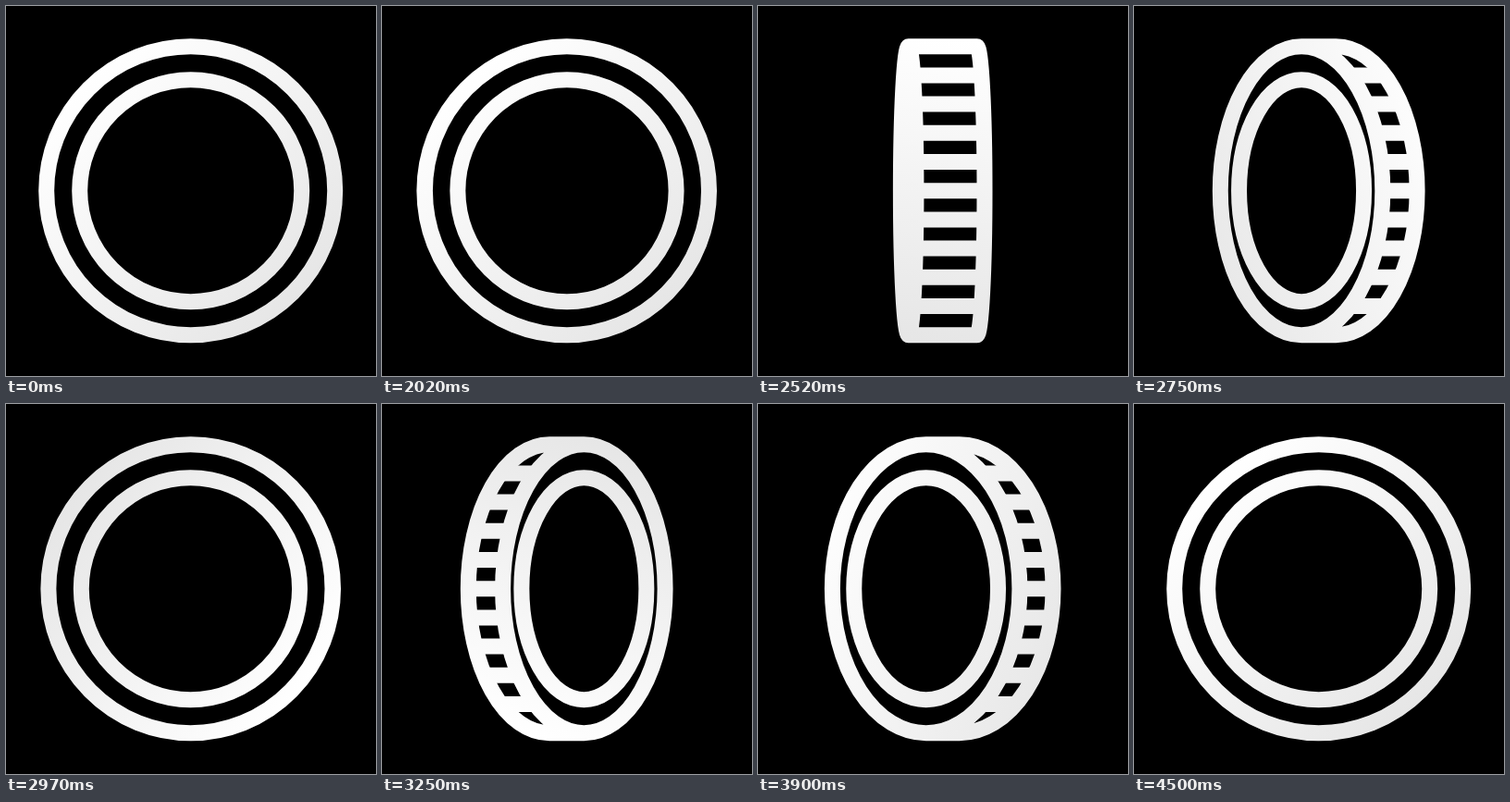
Write an HTML page that moves like this. It is 400 px wide and 400 px high and loops after 4520 ms.

```html
<!DOCTYPE html>
<html lang="en">
<head>
<meta charset="utf-8">
<title>Spinning coin</title>
<style>
  html, body { margin: 0; width: 100%; height: 100%; overflow: hidden; background: #000; }
  svg { display: block; width: 100%; height: 100%; }
</style>
</head>
<body>
<svg viewBox="0 0 400 400">
  <defs>
    <linearGradient id="shade" gradientUnits="userSpaceOnUse">
      <stop offset="0" stop-color="#fff"/>
      <stop offset="1" stop-color="#e6e6e6"/>
    </linearGradient>
  </defs>
  <path id="coin" fill="none" stroke="url(#shade)" stroke-width="17" stroke-linejoin="round"/>
  <path id="rim" fill="none" stroke="url(#shade)" stroke-width="17" stroke-linecap="butt"/>
</svg>
<script>
const LOOP = 4520, START = 1995, STEP = 25, STEPS = 100;
const MID = 199.7, R = 156, INNER = 120, DEPTH = 37.3, BARS = 10;
const coin = document.getElementById('coin');
const rim = document.getElementById('rim');
const shade = document.getElementById('shade');

// Slow start, linear finish: cubic-bezier(.167, 0, .833, .833)
function easeIn(u) {
  let lo = 0, hi = 1, s = 0;
  for (let i = 0; i < 24; i++) {
    s = (lo + hi) / 2;
    const x = 0.5 * s * (1 - s) ** 2 + 2.5 * s * s * (1 - s) + s ** 3;
    if (x < u) lo = s; else hi = s;
  }
  return 2.5 * s * s * (1 - s) + s ** 3;
}

const smooth = u => u * u * (3 - 2 * u);

// turn: 0 = facing us, 1 = edge on; side: where the rim shows
function pose(n) {
  if (n <= 0 || n >= STEPS) return { turn: 0, depth: 0, side: 1 };
  if (n >= 60) {
    const left = 1 - (n - 60) / 40;
    return { turn: left ** 2.05, depth: left ** 1.42, side: 1 };
  }
  const u = n % 20 / 20, opening = n >= 20 && n < 40;
  const k = opening ? 1 - u : u;
  return { turn: easeIn(k), depth: smooth(k), side: opening ? 1 : -1 };
}

// step, angle in degrees
const LIGHT = [[0, 45], [20, 90], [40, 225], [60, 365], [100, 405]];
const SPAN = 165;

function light(n) {
  let i = 0;
  while (i < LIGHT.length - 2 && n > LIGHT[i + 1][0]) i++;
  const a = LIGHT[i], b = LIGHT[i + 1], k = (n - a[0]) / (b[0] - a[0]);
  const angle = (a[1] + (b[1] - a[1]) * k) * Math.PI / 180;
  const dx = Math.cos(angle) * SPAN, dy = Math.sin(angle) * SPAN;
  const ends = { x1: MID - dx, y1: MID - dy, x2: MID + dx, y2: MID + dy };
  for (const key in ends) shade.setAttribute(key, ends[key].toFixed(2));
}

function ring(cx, rx, ry) {
  const arc = `A${rx} ${ry} 0 0 1 ${cx}`;
  return `M${cx} ${MID - ry}${arc} ${MID + ry}${arc} ${MID - ry}Z`;
}

function draw(t) {
  const n = Math.min(STEPS, Math.max(0, Math.floor((t - START) / STEP)));
  const { turn, depth, side } = pose(n);
  const c = Math.max(1 - turn, 0.004);
  const front = MID - side * DEPTH * depth, back = MID + side * DEPTH * depth;
  const sweep = side > 0 ? 1 : 0;

  // The far edge joins the front's top and bottom through the outer bars
  coin.setAttribute('d', ring(front, R * c, R) + ring(front, INNER * c, INNER) +
    `M${front} ${MID - R}L${back} ${MID - R}` +
    `A${R * c} ${R} 0 0 ${sweep} ${back} ${MID + R}L${front} ${MID + R}`);

  let bars = '';
  for (let k = 1; k < BARS; k++) {
    const y = 2 * R * k / BARS - R;
    const bulge = side * c * Math.sqrt(R * R - y * y);
    bars += `M${front + bulge} ${MID + y}L${back + bulge} ${MID + y}`;
  }
  rim.setAttribute('d', depth ? bars : '');
  light(n);
}

const begin = performance.now();
function tick() {
  draw((performance.now() - begin) % LOOP);
  requestAnimationFrame(tick);
}
tick();
</script>
</body>
</html>
```
